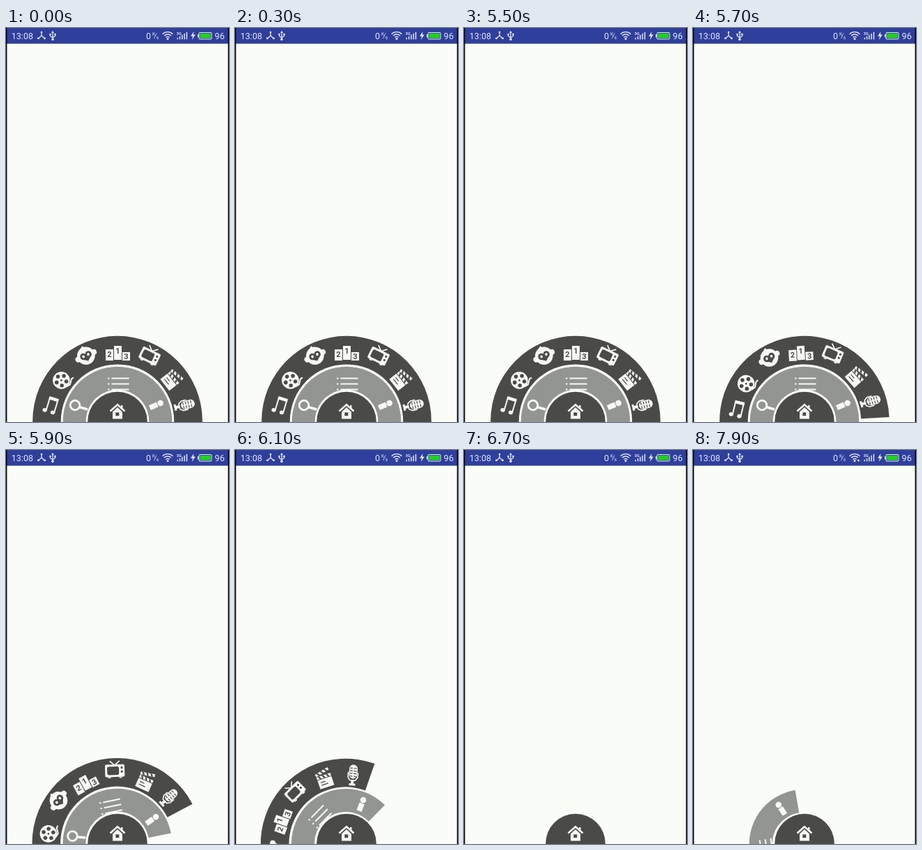
Recreate the animation shown at these times as an HTML page with a canvas. Size 320x564 px, loop 8000 ms.

```html
<!DOCTYPE html>
<html lang="en">
<head>
<meta charset="utf-8">
<title>Rotating arc menu</title>
<style>
html, body { margin: 0; width: 100%; height: 100%; overflow: hidden; background: #fafcf8; }
canvas { display: block; width: 320px; height: 564px; }
</style>
</head>
<body>
<canvas id="stage"></canvas>
<script>
const W = 320, H = 564, CX = 160, CY = 564, LOOP = 8000, STEP = 100, EDGE = 1.4;
const PAPER = '#fafcf8', DARK = '#4a4b49', GRAY = '#939592', ICON = '#f8f9f6', BAR = '#2f3f9c', BAR_INK = '#e3e7f6';
const canvas = document.getElementById('stage');
const ctx = canvas.getContext('2d');
const scale = window.devicePixelRatio || 1;
canvas.width = W * scale;
canvas.height = H * scale;

const rad = deg => deg * Math.PI / 180;

function rect(x, y, w, h, color = ICON) {
  ctx.fillStyle = color;
  ctx.fillRect(x, y, w, h);
}

function oval(x, y, rx, ry = rx, color = ICON) {
  ctx.fillStyle = color;
  ctx.beginPath();
  ctx.ellipse(x, y, rx, ry, 0, 0, 7);
  ctx.fill();
}

function rounded(x, y, w, h, r, color = ICON) {
  ctx.fillStyle = color;
  ctx.beginPath();
  ctx.roundRect(x, y, w, h, r);
  ctx.fill();
}

function trace(points) {
  ctx.beginPath();
  points.forEach(([x, y]) => ctx.lineTo(x, y));
}

function line(points, width, color = ICON) {
  trace(points);
  ctx.strokeStyle = color;
  ctx.lineWidth = width;
  ctx.stroke();
}

function shape(points, color = ICON) {
  trace(points);
  ctx.fillStyle = color;
  ctx.fill();
}

function arc(x, y, r, from, to, width, color = ICON) {
  ctx.beginPath();
  ctx.arc(x, y, r, from, to);
  ctx.strokeStyle = color;
  ctx.lineWidth = width;
  ctx.stroke();
}

function text(s, x, y, font, color) {
  ctx.font = font + ' Roboto, sans-serif';
  ctx.fillStyle = color;
  ctx.fillText(s, x, y);
}

function at(x, y, deg, draw) {
  ctx.save();
  ctx.translate(x, y);
  ctx.rotate(rad(deg));
  draw();
  ctx.restore();
}

// Places an icon on a ring, upright when it passes the top.
function onRing(deg, r, draw, turn = deg) {
  at(CX + r * Math.sin(rad(deg)), CY - r * Math.cos(rad(deg)), turn, draw);
}

// The arcs are centred slightly above the pivot and run straight down to it.
function halfRing(inner, outer, lift, color) {
  ctx.fillStyle = color;
  ctx.beginPath();
  ctx.moveTo(CX - outer, CY);
  ctx.arc(CX, CY - lift, outer, Math.PI, 0);
  ctx.lineTo(CX + outer, CY);
  ctx.lineTo(CX + inner, CY);
  ctx.arc(CX, CY - lift, inner, 0, Math.PI, true);
  ctx.lineTo(CX - inner, CY);
  ctx.fill();
}

function note() {
  shape([[-6, -12], [8, -12], [8, -7.5], [-6, -7.5]]);
  line([[-5, -10], [-5, 9]], 2);
  line([[7, -10], [7, 9]], 2);
  oval(-7, 9, 3.2, 2.8);
  oval(5, 9, 3.2, 2.8);
}

function reel() {
  oval(-1.5, 0, 12.3);
  for (let i = 0; i < 5; i++) {
    const a = rad(i * 72 - 60);
    oval(-1.5 + 7.3 * Math.cos(a), 7.3 * Math.sin(a), 2.8, 2.8, DARK);
  }
  oval(-1.5, 0, 1.4, 1.4, DARK);
  line([[6, 9], [11, 6], [13, -2], [16, -4]], 2);
}

function monkey() {
  oval(-12.5, 0, 4);
  oval(12.5, 0, 4);
  oval(0, 0, 12.8);
  shape([[-5, -11], [1, -15], [4, -10]]);
  oval(-4, -0.5, 4.6, 4.8, DARK);
  oval(4, -0.5, 4.6, 4.8, DARK);
  shape([[-7.5, 2], [7.5, 2], [0, 8]], DARK);
  oval(-3.8, -0.5, 1.8, 2);
  oval(3.8, -0.5, 1.8, 2);
}

function podium() {
  rect(-17, -6, 11, 16);
  rect(-5, -11, 11, 20);
  rect(7, -2, 11, 12);
  ctx.textAlign = 'center';
  text('2', -11.5, 5, 'bold 11px', DARK);
  text('1', 0.5, 0, 'bold 11px', DARK);
  text('3', 12.5, 8, 'bold 11px', DARK);
  ctx.textAlign = 'left';
}

function tv() {
  line([[-7, -13], [0, -7], [7, -13]], 1.6);
  rounded(-14, -8, 28, 18, 2);
  rounded(-11, -5, 17, 12, 2.5, DARK);
  oval(10, -3, 1.6, 1.6, DARK);
  oval(10, 2.5, 1.6, 1.6, DARK);
  rect(-10, 10, 4, 1.5);
  rect(6, 10, 4, 1.5);
}

function slat() {
  rect(0, -4, 21, 4);
  for (let x = 4; x < 19; x += 6) shape([[x, 0], [x + 2.5, 0], [x + 0.5, -4], [x - 2, -4]], DARK);
}

function clapper() {
  rect(-10.5, -1, 21, 13);
  rect(-7, 2.5, 7, 1.2, DARK);
  rect(-7, 6.5, 10, 1.2, DARK);
  at(-10.5, -2, 0, slat);
  at(-10.5, -6.5, -13, slat);
}

function mic() {
  rounded(-6, -15, 12, 20, 6);
  for (let y = -10.5; y < 2; y += 3.8) {
    rect(-4.8, y, 4, 1.2, DARK);
    rect(0.8, y, 4, 1.2, DARK);
  }
  line([[-7, -4], [-7, 3], [-4, 7.5], [4, 7.5], [7, 3], [7, -4]], 1.6);
  rect(-2, 7, 4, 6);
  rect(-4.5, 12, 9, 3);
}

function outerRing() {
  halfRing(81.2, 121.8, 1.4, DARK);
  onRing(-76, 98, note, 17);
  onRing(-53, 99, reel, 0);
  onRing(-25.5, 105, monkey);
  onRing(0, 98, podium);
  onRing(26, 106, tv);
  onRing(52, 98, clapper);
  onRing(76, 99, mic);
}

function innerRing() {
  halfRing(45.3, 78.3, 1, GRAY);
  arc(99, 540, 6.8, 0, 7, 2.8);
  line([[105, 542.5], [117, 546]], 3.6);
  for (let y = 500.5; y < 520; y += 8) {
    rect(146, y, 2.5, 2);
    rect(151.5, y, 25, 2);
  }
  onRing(66.3, 56.5, () => rect(-3.8, -5.8, 7.6, 11.6));
  onRing(66.3, 67.3, () => oval(0, 0, 4.3));
}

function home() {
  oval(CX, CY - 0.5, 42.8, 42.8, DARK);
  rect(165, 540, 2.5, 6);
  line([[149.5, 548.5], [160, 539.3], [170.5, 548.5]], 2.6);
  shape([[153, 549.5], [160, 543], [167, 549.5], [167, 559.5], [153, 559.5]]);
  rect(157.3, 550.3, 5, 4.8, DARK);
}

function statusBar(transfer) {
  rect(0, 0, W, 22.5, BAR);
  text('13:08', 7.8, 15.6, '12.5px', BAR_INK);
  line([[51, 5.5], [51, 11], [46.5, 15]], 1.3, BAR_INK);
  line([[51, 11], [55.5, 15]], 1.3, BAR_INK);
  oval(51, 6, 1.3, 1.3, BAR_INK);
  oval(46.5, 14.8, 1.6, 1.3, BAR_INK);
  oval(55.5, 14.8, 1.6, 1.3, BAR_INK);

  line([[67, 6], [67, 16]], 1.3, BAR_INK);
  line([[63.5, 9], [63.5, 11.5], [67, 14], [70.5, 11.5], [70.5, 8.5]], 1.3, BAR_INK);
  shape([[65, 7], [67, 4], [69, 7]], BAR_INK);
  oval(67, 16.3, 1.8, 1.8, BAR_INK);
  oval(63.5, 9, 1.3, 1.3, BAR_INK);
  rect(69.3, 7.8, 2.4, 2.4, BAR_INK);

  text('0', 201, 15.6, '12.5px', BAR_INK);
  text('K', 210, 11, '6.5px', BAR_INK);
  line([[212.5, 15], [216, 7.5]], 0.8, BAR_INK);
  text('s', 215.7, 15.6, '6.5px', BAR_INK);

  for (const r of [3.6, 7, 10.4]) arc(232, 16, r, rad(-135), rad(-45), 1.4, BAR_INK);
  oval(232, 15.6, 1.5, 1.5, BAR_INK);
  if (transfer) shape([[235.5, 14], [239.5, 14], [237.5, 17]], BAR_INK);

  text('3G', 244.8, 9.6, 'bold 5.5px', BAR_INK);
  for (let i = 0; i < 5; i++) {
    const h = 2.5 + i * 2;
    rect(245.5 + i * 3.3, 16.3 - h, 1.5, h, BAR_INK);
  }
  shape([[269.5, 5], [265, 11.8], [268, 11.8], [266.8, 17], [271.8, 9.6], [268.8, 9.6]], BAR_INK);
  rounded(276.5, 6, 19, 10.5, 2, BAR_INK);
  rounded(277.5, 7, 17, 8.5, 1.2, BAR);
  rect(278.3, 7.8, 15.4, 6.9, '#22cf22');
  rect(275, 9, 1.5, 4.5, BAR_INK);
  text('96', 299.6, 15.6, '12.5px', BAR_INK);
}

const ease = u => (1 - Math.cos(Math.PI * Math.min(1, Math.max(0, u)))) / 2;
const closing = t => t < 6100 ? (t - 5600) * 0.000862 : 0.431 + (t - 6100) * 0.00108;
const outerTurn = t => -180 * ease(closing(t));
const innerTurn = t => t < 7400
  ? -180 * ease(closing(t) - 0.096)
  : -180 * (1 - ease((t - 7400) * 0.00093));

function turned(deg, draw) {
  if (deg < -179.5) return;
  at(CX, CY, deg, () => {
    ctx.translate(-CX, -CY);
    draw();
  });
}

function render(t) {
  ctx.setTransform(scale, 0, 0, scale, 0, 0);
  rect(0, 0, W, H, PAPER);
  turned(outerTurn(t), outerRing);
  turned(innerTurn(t), innerRing);
  home();
  statusBar(t >= 7400);
  rect(0, 0, EDGE, H, '#000');
  rect(W - EDGE, 0, EDGE, H, '#000');
}

const start = performance.now();
function tick() {
  const t = (performance.now() - start) % LOOP;
  render(Math.floor(t / STEP) * STEP);
  requestAnimationFrame(tick);
}
tick();
</script>
</body>
</html>
```
